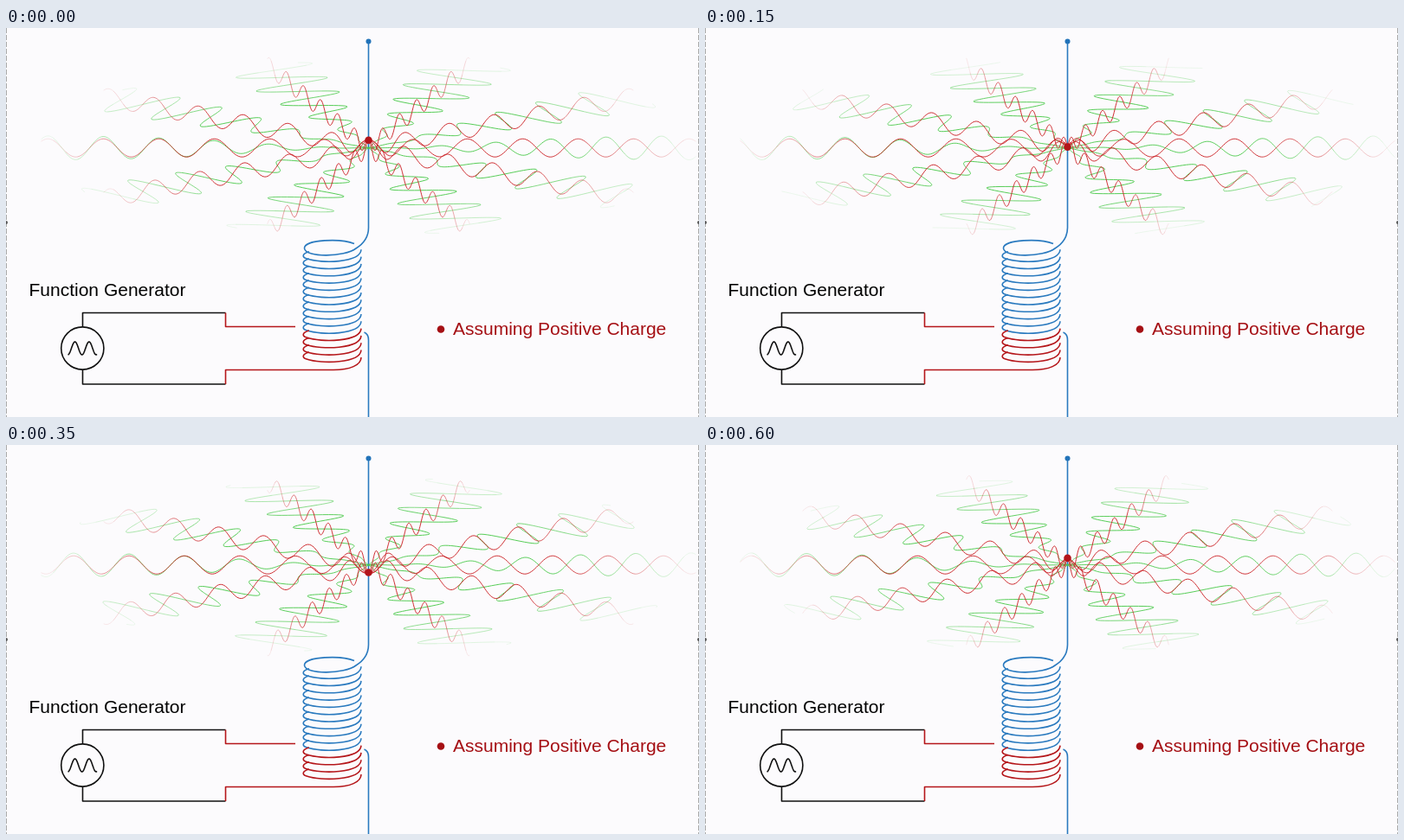
Animation, 800 px wide and 450 px high, one loop 0.65 s. Source, as an HTML page:

```html
<!DOCTYPE html>
<html lang="en">
<head>
<meta charset="utf-8">
<title>Radiating antenna</title>
<style>
  html, body { margin: 0; width: 100%; height: 100%; overflow: hidden; background: #fcfbfd; }
  svg { display: block; width: 800px; height: 450px; }
  text { font: 21px "Liberation Sans", Arial, sans-serif; }
  .line { fill: none; stroke-width: 1.6; stroke-linejoin: round; }
  .wave { fill: none; stroke-width: 0.95; stroke-linejoin: round; }
  .black { stroke: #111; }
  .red { stroke: #b5161a; }
  .blue { stroke: #2a7abf; }
</style>
</head>
<body>
<svg viewBox="0 0 800 450" xmlns="http://www.w3.org/2000/svg">
  <rect width="800" height="450" fill="#fcfbfd"/>
  <path d="M.5 0V450M799.5 0V450" stroke="#aaa" stroke-dasharray="6 2"/>
  <g fill="#555"><circle cx="0" cy="225" r="2"/><circle cx="800" cy="225" r="2"/></g>

  <path class="line blue" d="M418.5 15V231C418.5 243 412 250 404 255C391 265 346 266 344.5 255C344 244 388 243.5 402 249.5"/>
  <circle cx="418.5" cy="15.5" r="3" fill="#2273b9"/>
  <g id="coil"></g>
  <path class="line blue" d="M413.5 352Q418.5 354 418.5 361V450"/>

  <path class="line black" d="M88.5 346V329.5H253.5M88.5 395V412H253.5"/>
  <path class="line red" d="M253.5 329.5V345.5H334M253.5 412V395.5H378C397 395.5 410 390 410 381"/>
  <circle class="line black" cx="88.3" cy="370.5" r="24.6"/>
  <path id="sine" class="line black"/>

  <text x="26.5" y="310">Function Generator</text>
  <circle cx="502" cy="348.5" r="4.3" fill="#a50f14"/>
  <text x="516" y="355" fill="#a50f14">Assuming Positive Charge</text>

  <g id="magnetic" stroke="#4fcb4f"></g>
  <g id="electric" stroke="#cc2226"></g>
  <circle id="charge" cx="418.5" r="4.3" fill="#b3141a"/>
</svg>
<script>
const PERIOD = 650, STEP = 50, TAU = 2 * Math.PI;
const CX = 418.5, CY = 138.7, TILT = 0.266;
const RADIUS = 378, CHUNK = 14, RAYS = 10, WAVELENGTH = 64;
const byId = id => document.getElementById(id);

function addPath(parent, cls, d = '') {
  const path = document.createElementNS('http://www.w3.org/2000/svg', 'path');
  path.setAttribute('class', cls);
  path.setAttribute('d', d);
  parent.appendChild(path);
  return path;
}

function polyline(from, to, step, point) {
  let d = '';
  for (let v = from; v <= to + 1e-6; v += step) {
    const [x, y] = point(v);
    d += (d ? 'L' : 'M') + x.toFixed(2) + ' ' + y.toFixed(2);
  }
  return d;
}

byId('sine').setAttribute('d', polyline(71.5, 105, 0.5,
  x => [x, 370.5 - 7.5 * Math.sin(TAU * (x - 75.5) / 16.3)]));

for (let i = 1; i < 16; i++) {
  const y = 255 + 8.3 * i;
  addPath(byId('coil'), 'line ' + (i < 12 ? 'blue' : 'red'),
    `M350 ${y - 4.5}C341 ${y - 2} 342 ${y + 2} 347 ${y + 3.5}C364 ${y + 9.5} 409 ${y + 8.5} 410 ${y - 7}`);
}

// Smooth rise from 0 to 1 over about the given distance.
const rise = (r, distance) => 1 - Math.exp(-((r / distance) ** 2));

// The phase runs ahead close to the charge, then grows evenly.
const phase = r => TAU * (r + 14 * rise(r, 32)) / WAVELENGTH;
const swing = (r, angle) => Math.cos(phase(r) - angle);

function electricPoint(r, dir, angle) {
  const height = (9 + 1.5 * rise(r, 60)) * swing(r, angle);
  return [CX + r * Math.cos(dir), CY - r * TILT * Math.sin(dir) - height];
}

function magneticPoint(r, dir, angle) {
  const side = 53 * rise(r, 185) * swing(r, angle);
  return [
    CX + r * Math.cos(dir) + side * Math.sin(dir),
    CY - TILT * (r * Math.sin(dir) - side * Math.cos(dir))
  ];
}

// Each chunk spans one ring of all rays, so that opacity can fall off outward.
function makeField(id, point) {
  const chunks = [];
  for (let r = 0; r < RADIUS; r += CHUNK) {
    const path = addPath(byId(id), 'wave');
    const fade = Math.min(1, (RADIUS + 4 - r) / 180);
    path.setAttribute('stroke-opacity', fade.toFixed(3));
    chunks.push({ r, path });
  }
  return angle => chunks.forEach(({ r, path }) => {
    let d = '';
    for (let i = 0; i < RAYS; i++) {
      const dir = TAU * i / RAYS;
      d += polyline(r, r + CHUNK, 2, v => point(v, dir, angle));
    }
    path.setAttribute('d', d);
  });
}

const fields = [makeField('magnetic', magneticPoint), makeField('electric', electricPoint)];

function draw(time) {
  const angle = TAU * Math.floor((time % PERIOD) / STEP) * STEP / PERIOD;
  fields.forEach(update => update(angle));
  byId('charge').setAttribute('cy', CY - 9 * Math.cos(angle));
}

const start = performance.now();
function tick() {
  draw(performance.now() - start);
  requestAnimationFrame(tick);
}
tick();
</script>
</body>
</html>
```
